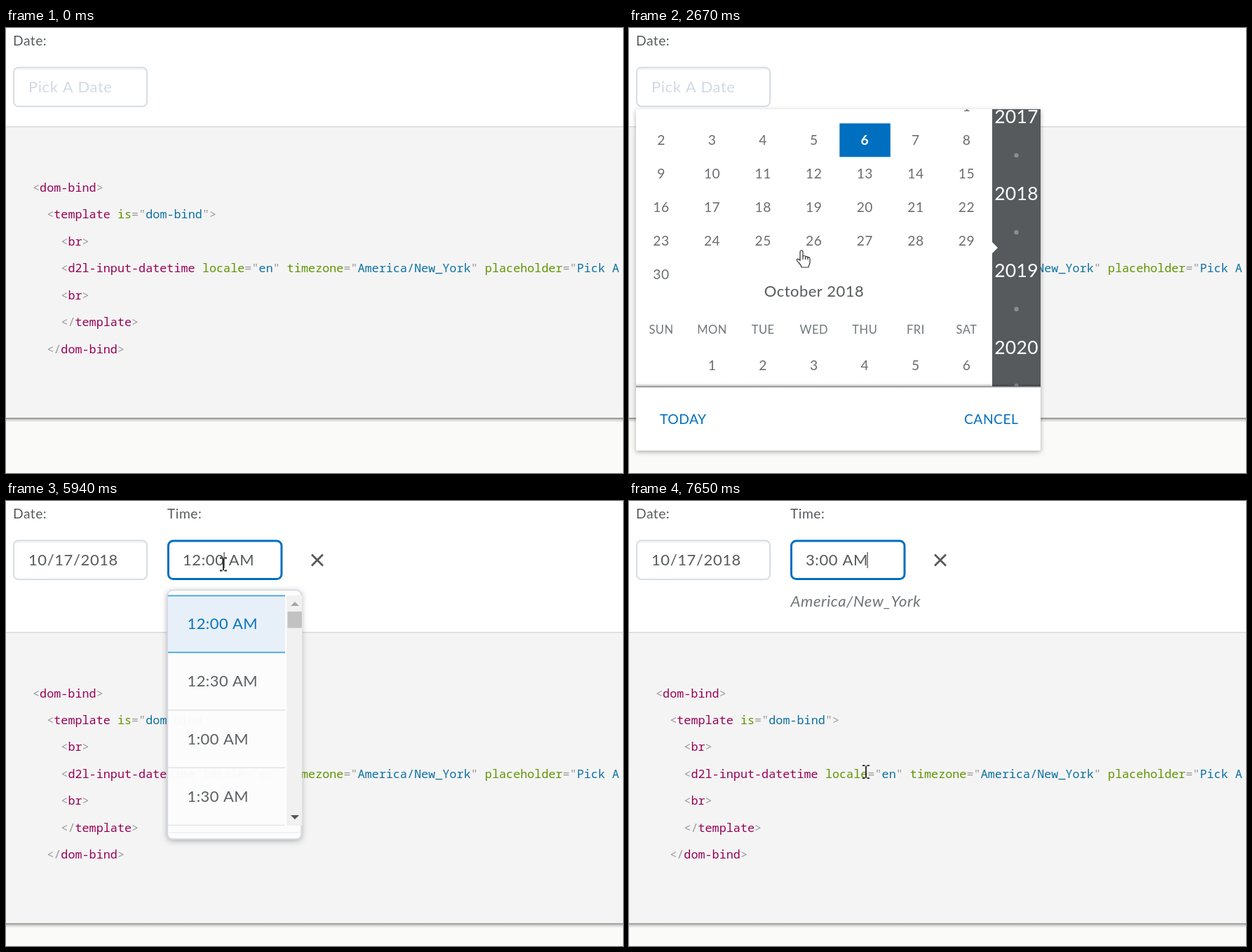
These frames come from a looping animation (880 by 636 pixels, 8 s). An HTML page with a canvas:

```html
<!DOCTYPE html>
<html lang="en">
<head>
<meta charset="utf-8">
<title>Date and time picker</title>
<style>
html, body { margin: 0; width: 100%; height: 100%; overflow: hidden; background: #fff; }
canvas { display: block; }
</style>
</head>
<body>
<canvas id="stage" width="880" height="636"></canvas>
<script>
const ctx = document.getElementById('stage').getContext('2d');
const LOOP = 8000, BLUE = '#006fbf', INK = '#565a5c', PALE = '#d3d9e3';
const TAG = '#905', ATTR = '#5f9400', VALUE = '#0c70a3', PUNCT = '#999';

const clamp = v => Math.max(0, Math.min(1, v));
const prog = (t, a, b) => clamp((t - a) / (b - a));
const smooth = p => p * p * (3 - 2 * p);
const out = p => 1 - (1 - p) ** 3;

function text(s, x, y, size, color, { align = 'left', gap = 0.5, style = '' } = {}) {
  ctx.font = `${style} ${size}px Lato, sans-serif`;
  ctx.letterSpacing = gap + 'px';
  ctx.textAlign = align;
  ctx.fillStyle = color;
  ctx.fillText(s, x, y + size * 0.36);
}

function rect(x, y, w, h, color) {
  ctx.fillStyle = color;
  ctx.fillRect(x, y, w, h);
}

function path(points, fill, stroke, width = 1) {
  ctx.beginPath();
  points.forEach(([x, y]) => ctx.lineTo(x, y));
  ctx.closePath();
  if (fill) { ctx.fillStyle = fill; ctx.fill(); }
  if (stroke) { ctx.strokeStyle = stroke; ctx.lineWidth = width; ctx.stroke(); }
}

function clipped(x, y, w, h, draw) {
  ctx.save();
  ctx.beginPath();
  ctx.rect(x, y, w, h);
  ctx.clip();
  draw();
  ctx.restore();
}

function card(x, y, w, h, r, blur) {
  ctx.save();
  ctx.shadowColor = 'rgba(0,0,0,.32)';
  ctx.shadowBlur = blur;
  ctx.shadowOffsetY = 2;
  ctx.fillStyle = '#fff';
  ctx.beginPath();
  ctx.roundRect(x, y, w, h, r);
  ctx.fill();
  ctx.restore();
}

// ---- page ----
const CODE = [
  [0, '<', 'dom-bind', '>'],
  [2, '<', 'template', ' is="dom-bind"', '>'],
  [4, '<', 'br', '>'],
  [4, '<', 'd2l-input-datetime', ' locale="en" timezone="America/New_York" placeholder="Pick A Date"', '>'],
  [4, '<', 'br', '>'],
  [4, '</', 'template', '>'],
  [2, '</', 'dom-bind', '>']
];

function codeLine([indent, open, tag, ...rest], y) {
  const pitch = 10.08;
  let x = 38 + indent * pitch;
  const put = (s, color) => {
    ctx.fillStyle = color;
    ctx.fillText(s, x, y);
    x += s.length * pitch;
  };
  put(open, PUNCT);
  put(tag, TAG);
  for (const part of rest) {
    let quoted = false;
    for (const s of part.match(/[="<>]|[^="<>]+/g)) {
      if (s === '"') quoted = !quoted;
      put(s, /[="<>]/.test(s) ? PUNCT : quoted ? VALUE : ATTR);
    }
  }
}

function page(top) {
  rect(0, 0, 880, 636, '#fff');
  rect(0, top, 880, 416, '#f4f4f4');
  rect(0, top - 1, 880, 1.5, '#dadada');
  const end = top + 416;
  rect(0, end, 880, 636 - end, '#fafaf8');
  const g = ctx.createLinearGradient(0, end, 0, end + 6);
  g.addColorStop(0, 'rgba(0,0,0,.28)');
  g.addColorStop(1, 'rgba(0,0,0,0)');
  rect(0, end, 880, 6, g);
  rect(0, end - 0.5, 880, 1.5, '#939393');
  ctx.font = '16.8px "Noto Sans Mono", monospace';
  ctx.letterSpacing = '0px';
  ctx.textAlign = 'left';
  CODE.forEach((line, i) => codeLine(line, top + 92.5 + i * 38.45));
}

// focus: 0 idle, 2 hover, 3 focused (border width)
function field(x, w, value, color, focus) {
  const lw = focus || 1.8;
  ctx.beginPath();
  ctx.roundRect(x + lw / 2, 55.5 + lw / 2, w - lw, 57.5 - lw, 7);
  ctx.fillStyle = '#fff';
  ctx.fill();
  if (!focus) rect(x + 5, 57.5, w - 10, 2, '#f0f1f3');
  ctx.strokeStyle = focus ? BLUE : PALE;
  ctx.lineWidth = lw;
  ctx.stroke();
  text(value, x + 22, 84, 22, color, { gap: 0.6 });
}

// ---- calendar ----
const DAYS = ['SUN', 'MON', 'TUE', 'WED', 'THU', 'FRI', 'SAT'];
const MONTHS = [['September 2018', 6, 30], ['October 2018', 1, 31], ['November 2018', 4, 30]];
const colX = c => 46 + c * 72.58;

function month([name, first, count], y, today) {
  const mid = { align: 'center' };
  text(name, 264, y, 22, INK, { align: 'center', gap: 0.45 });
  DAYS.forEach((d, c) => text(d, colX(c), y + 55, 16.5, '#72777a', mid));
  for (let d = 1; d <= count; d++) {
    const cell = first + d - 1, x = colX(cell % 7), cy = y + 106.5 + Math.floor(cell / 7) * 48;
    if (d === today) {
      rect(x - 36, cy - 23.5, 72.5, 48, BLUE);
      text(d, x, cy, 19.25, '#fff', { align: 'center', style: 'bold' });
    } else text(d, x, cy, 19.25, '#6a6e71', mid);
  }
}

function calendar(scroll) {
  card(10, 116, 577, 488, 2, 6);
  clipped(10, 116, 577, 397, () => {
    MONTHS.forEach((m, i) => month(m, 142.5 + i * 370.5 - scroll, i ? 0 : 6));
    rect(518, 116, 69, 397, INK);
    for (let i = 0; i < 5; i++) {
      const y = 130 + i * 109.8 - scroll * 0.0247;
      text(2017 + i, 552.5, y, 26.5, '#fff', { align: 'center', gap: 0.3 });
      ctx.fillStyle = '#8b8e90';
      ctx.beginPath();
      ctx.arc(552.5, y + 55.5, 3.2, 0, 7);
      ctx.fill();
    }
    path([[518, 306], [526, 314], [518, 322]], '#fff');
    const g = ctx.createLinearGradient(0, 508, 0, 513);
    g.addColorStop(0, 'rgba(0,0,0,0)');
    g.addColorStop(1, 'rgba(0,0,0,.3)');
    rect(10, 508, 577, 5, g);
  });
  rect(10, 512, 577, 1.5, '#85888a');
  text('TODAY', 44, 559, 19.25, BLUE);
  text('CANCEL', 478, 559, 19.25, BLUE);
}

// ---- time list ----
function timeList(scroll) {
  card(230, 127, 191.5, 356.5, 7, 9);
  ctx.strokeStyle = PALE;
  ctx.lineWidth = 1.5;
  ctx.beginPath();
  ctx.roundRect(230.5, 127.5, 190.5, 355.5, 7);
  ctx.stroke();
  rect(232, 473, 188, 1.5, '#eceef1');
  clipped(231, 134, 167, 330, () => {
    for (let i = 0; i < 9; i++) {
      const y = 134.5 + i * 82.4 - scroll;
      const label = `${Math.floor(i / 2) || 12}:${i % 2 ? '30' : '00'} AM`;
      if (!i) {
        rect(231, y, 167, 82, '#e7f0f8');
        rect(231, y, 167, 1.8, '#3f9fdf');
      }
      rect(231, y + 81, 167, 1.8, i ? '#e0e3e8' : '#3f9fdf');
      text(label, 258.5, y + 40.5, 22, i ? INK : BLUE, { gap: 0.4 });
    }
  });
  if (scroll) {
    const g = ctx.createLinearGradient(0, 134, 0, 139);
    g.addColorStop(0, 'rgba(0,0,0,.1)');
    g.addColorStop(1, 'rgba(0,0,0,0)');
    rect(231, 134, 169, 5, g);
  }
  rect(400.5, 135, 22, 329, '#f1f1f1');
  rect(401.5, 158 + scroll * 0.073, 20.5, 23.5, '#c1c1c1');
  path([[406, 150], [412, 144], [418, 150]], scroll ? '#505050' : '#a3a3a3');
  path([[406, 449], [412, 455], [418, 449]], '#505050');
}

// ---- pointer ----
const TRACK = [
  [170, 585, 597], [950, 150, 92], [1110, 138, 88], [1800, 138, 88], [1950, 143, 137],
  [2350, 246, 318], [2760, 246, 318], [3130, 267, 391], [3280, 267, 391], [3830, 274, 440],
  [4600, 274, 440], [4680, 267, 413], [5400, 310, 90], [6380, 310, 90], [6700, 341, 301],
  [6850, 341, 301], [7260, 338, 386], [8000, 338, 387]
];

function pointerAt(t) {
  let i = 1;
  while (i < TRACK.length - 1 && TRACK[i][0] < t) i++;
  const [a, x, y] = TRACK[i - 1], [b, u, v] = TRACK[i], p = smooth(prog(t, a, b));
  return [x + (u - x) * p, y + (v - y) * p];
}

const HAND = new Path2D('M-2 2C-2-1 2-1 2 2V9C2 7 6 7 6 9V10C6 8 9 8 9 10V11C9 9 12 9 12 12V17' +
  'C12 20 10 21 10 24H0C0 21-3 19-6 15C-8 12-5 11-2 14Z');

function pointer(t) {
  if (t < 170) return;
  const [x, y] = pointerAt(t);
  const inField = y < 114, overDays = t > 1950 && t < 4150 && y > 220;
  const overList = t > 6380 && t < 7410 && y > 127;
  ctx.save();
  ctx.translate(x, y);
  if (overDays || overList) {
    ctx.fillStyle = '#fff';
    ctx.strokeStyle = '#333';
    ctx.lineWidth = 1.2;
    ctx.fill(HAND);
    ctx.stroke(HAND);
    ctx.beginPath();
    for (const fx of [2, 5.5, 9]) { ctx.moveTo(fx, 9); ctx.lineTo(fx, 13); }
    ctx.stroke();
  } else if (inField || t >= 7410) {
    ctx.strokeStyle = '#222';
    ctx.lineWidth = 1.8;
    ctx.beginPath();
    ctx.moveTo(0, -8); ctx.lineTo(0, 9);
    for (const e of [-8.5, 9.5]) {
      ctx.moveTo(-5, e); ctx.lineTo(-1.5, e);
      ctx.moveTo(1.5, e); ctx.lineTo(5, e);
    }
    ctx.stroke();
  } else {
    path([[0, 0], [0, 18], [4, 14.5], [7, 21], [10, 19.5], [7.2, 13.3], [12.5, 13]], '#fff', '#444', 1.1);
  }
  ctx.restore();
}

// ---- timeline ----
function faded(alpha, draw) {
  if (alpha <= 0) return;
  ctx.save();
  ctx.globalAlpha = alpha;
  draw();
  ctx.restore();
}

// two wheel notches of equal length
const wheel = (t, a, b, span) => 137.2 * (out(prog(t, a, a + span)) + out(prog(t, b, b + span)));

function render(t) {
  const picked = t >= 4150, timed = t >= 7410;
  page(picked ? 188 : 141.5);
  text('Date:', 10, 18, 19.25, INK);
  const dateFocus = t < 900 || t >= 2100 ? 0 : t >= 1260 && t < 1900 ? 3 : 2;
  field(10, 192, picked ? '10/17/2018' : 'Pick A Date', picked ? INK : PALE, dateFocus);

  if (picked) {
    text('Time:', 230, 18, 19.25, INK);
    field(230, 164.5, timed ? '3:00 AM' : '12:00 AM', INK, t < 5330 ? 0 : t < 5500 ? 2 : 3);
    const caretOn = timed || (t >= 5760 && Math.floor((t - 5760) / 500) % 2 === 0);
    if (caretOn) rect(timed ? 339.5 : 310.5, 73, 1.3, 23, INK);
    ctx.strokeStyle = INK;
    ctx.lineWidth = 2.8;
    ctx.beginPath();
    ctx.moveTo(436, 76.5); ctx.lineTo(452, 92.5);
    ctx.moveTo(452, 76.5); ctx.lineTo(436, 92.5);
    ctx.stroke();
    text('America/New_York', 230.5, 143, 22, '#6e7376', { gap: 0.6, style: 'italic' });
    const shown = out(prog(t, 5550, 6130)) * (1 - prog(t, 7410, 7640));
    faded(shown, () => timeList(wheel(t, 6430, 6570, 210)));
  } else {
    faded(prog(t, 1440, 1660), () => calendar(wheel(t, 2300, 2700, 300)));
  }
  pointer(t);
}

const start = performance.now();
function tick() {
  render((performance.now() - start) % LOOP);
  requestAnimationFrame(tick);
}
tick();
</script>
</body>
</html>
```
